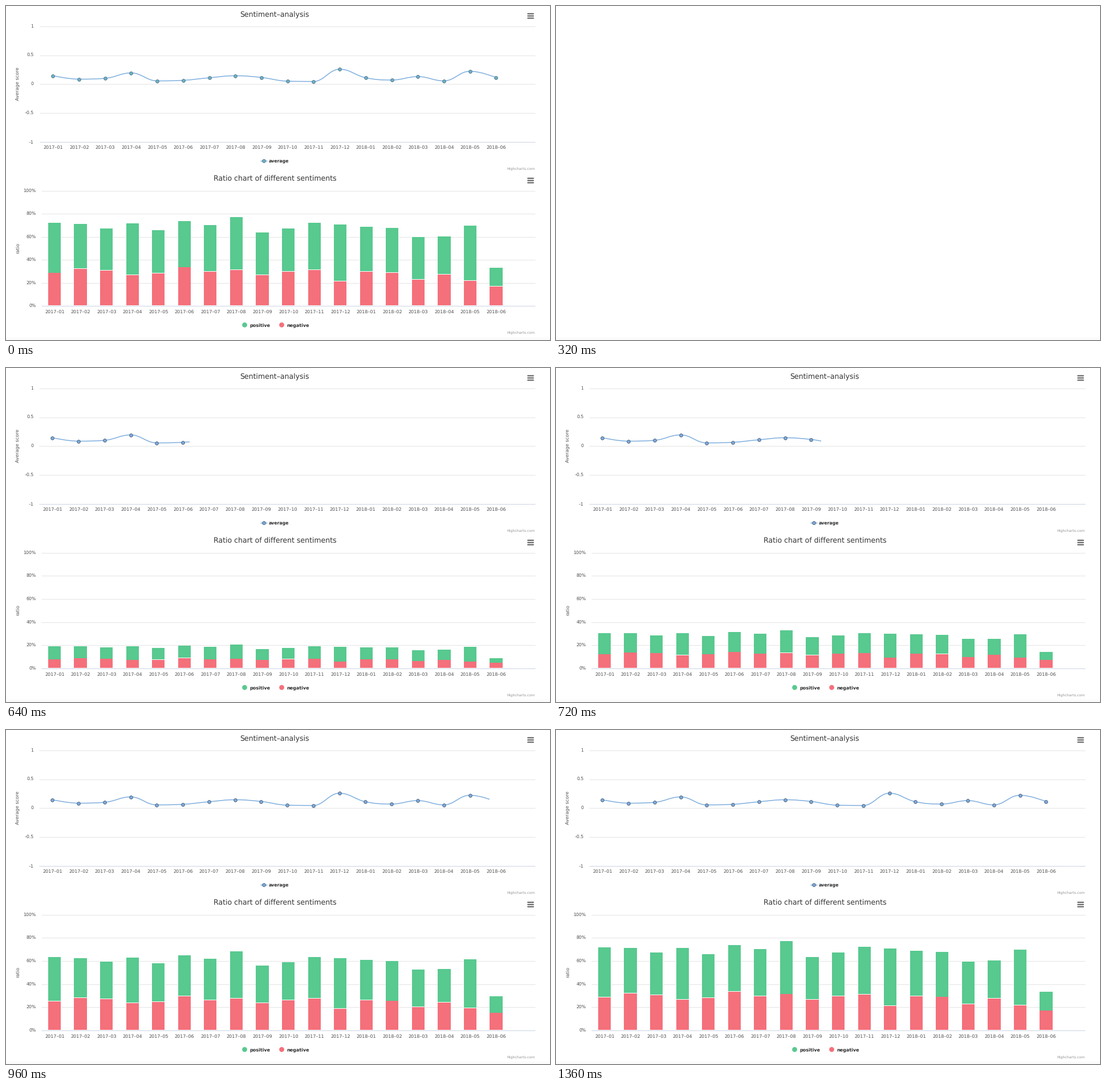
Recreate the animation shown at these times as a matplotlib script. Size 954 by 587 pixels, loop 1720 ms.

```python
import numpy as np
import matplotlib.pyplot as plt
from matplotlib.animation import FuncAnimation
from matplotlib.collections import PolyCollection
from matplotlib.patches import PathPatch, Rectangle
from matplotlib.path import Path

W, H, DPI = 954, 587, 128      # a power of two keeps the pixel size exact
STEP, FRAMES = 40, 43
HIDE, SHOW = 280, 400          # old charts go, new charts come (ms)
RIGHT, SLOTS = 928, 19

GRID, AXIS = "#e4e4e4", "#ccd3e2"
GREEN, RED, BLUE = "#58c98f", "#f4707b", "#7eaede"

MONTHS = [f"{2017 + k // 12}-{k % 12 + 1:02d}" for k in range(18)]
SCORE = np.array([.143, .084, .098, .192, .054, .064, .108, .143, .113,
                  .049, .044, .256, .108, .069, .128, .054, .221, .113])
TOTAL = np.array([71.8, 71.0, 67.3, 71.3, 65.6, 73.7, 70.3, 77.2, 63.5,
                  67.1, 72.0, 70.5, 68.8, 67.7, 59.6, 60.3, 69.5, 33.2])
NEGATIVE = np.array([28.4, 31.9, 30.5, 26.6, 28.0, 33.3, 29.4, 31.2, 26.6,
                     29.5, 31.0, 21.2, 29.4, 28.7, 22.7, 27.3, 21.6, 16.9])

plt.rcParams["font.family"] = "DejaVu Sans"
plt.rcParams["text.hinting"] = "none"
fig = plt.figure(figsize=(W / DPI, H / DPI), dpi=DPI, facecolor="white")
ax = fig.add_axes([0, 0, 1, 1])
ax.set_xlim(0, W)
ax.set_ylim(H, 0)
ax.axis("off")
ax.add_patch(Rectangle((0, 582), W, 5, fc="#fbfbfb", lw=0))


def px(size):
    return size * 72 / DPI


def spline(x, y):
    """Smooth path through the points without overshoot."""
    def handles(i):
        lx = (1.5 * x[i] + x[i - 1]) / 2.5
        rx = (1.5 * x[i] + x[i + 1]) / 2.5
        ly = (1.5 * y[i] + y[i - 1]) / 2.5
        ry = (1.5 * y[i] + y[i + 1]) / 2.5
        shift = (ry - ly) * (rx - x[i]) / (rx - lx) + y[i] - ry
        ly, ry = ly + shift, ry + shift
        lim = np.clip(ly, *sorted((y[i - 1], y[i])))
        if lim != ly:
            ly, ry = lim, 2 * y[i] - lim
        lim = np.clip(ry, *sorted((y[i + 1], y[i])))
        if lim != ry:
            ly, ry = 2 * y[i] - lim, lim
        return (lx, ly), (rx, ry)

    last = len(x) - 1
    verts, out = [(x[0], y[0])], (x[0], y[0])
    for i in range(1, last + 1):
        point = (x[i], y[i])
        into, nxt = handles(i) if i < last else (point, point)
        verts += [out, into, point]
        out = nxt
    return Path(verts, [Path.MOVETO] + [Path.CURVE4] * (len(verts) - 1))


def boxes(x, half, top, bottom):
    return [[(a - half, t), (a + half, t), (a + half, b), (a - half, b)]
            for a, t, b in zip(x, top, bottom)]


class Scene:
    """Both charts; the layout differs slightly before and after reloading."""

    def __init__(self, left, base, dot, edge):
        self.items = []
        self.left, self.base = left, base
        self.line_chart(dot, edge)
        self.bar_chart()

    def add(self, artist):
        self.items.append(artist)
        return artist

    def text(self, x, y, s, size, color="#505050", ha="center", **kw):
        kw.setdefault("va", "baseline")
        self.add(ax.text(x, y, s.replace("-", "\u2013"), fontsize=px(size),
                         color=color, ha=ha, **kw))

    def rule(self, x0, x1, y, color, width=1.0, z=1, cap="butt"):
        return self.add(ax.plot([x0, x1], [y, y], color=color, lw=px(width),
                                zorder=z, solid_capstyle=cap)[0])

    def dots(self, x, y, dot, edge):
        return self.add(ax.plot(x, y, "o", ms=px(5.7), mfc=dot, mec=edge,
                                mew=px(0.9), zorder=4, snap=False)[0])

    def frame(self, title, x, y, menu_y, credit_y):
        self.text(x, y, title, 12.5, "#333333")
        for dy in (-3.9, 0, 3.9):
            self.rule(915.1, 924.9, menu_y + dy, "#606060", 2.1,
                      cap="round").set_snap(False)
        self.text(RIGHT, credit_y, "Highcharts.com", 6.3, "#929292", "right")

    def y_axis(self, left, rows, labels, right, title, mid):
        for y, s in zip(rows, labels):
            zero = y == rows[-1]
            self.rule(left, RIGHT, np.floor(y) + .5, AXIS if zero else GRID,
                      z=3 if zero else 1)
            self.text(right, y + 3.2, s, 7.8, ha="right")
        self.text(21.3, mid, title, 8.25, rotation=90, va="center")

    def months(self, x, y):
        for a, s in zip(x, MONTHS):
            self.text(a, y, s, 8)

    def line_chart(self, dot, edge):
        self.frame("Sentiment-analysis", 471.3, 19, 17.5, 287.4)
        self.y_axis(self.left, np.linspace(35.3, 238.5, 5),
                    ["1", "0.5", "0", "-0.5", "-1"], 48.4,
                    "Average score", 136.5)
        slot = (RIGHT - self.left) / SLOTS
        x = self.left + slot * (np.arange(18) + .5)
        y = 137.1 - 101.7 * SCORE
        self.months(x + .3, 252)
        curve = self.add(ax.add_patch(PathPatch(
            spline(x, y), fc="none", ec=BLUE, lw=px(1.5), zorder=3)))
        self.clipped = [curve, self.dots(x, y, dot, edge)]
        self.rule(446.2, 457.8, 272, BLUE, 1.4)
        self.dots([452], [272], dot, edge)
        self.text(461, 274.8, "average", 7.8, "#2b2b2b", "left",
                  weight="bold")

    def bar_chart(self):
        low = self.base - 527
        self.frame("Ratio chart of different sentiments", 471.3, 308, 306.7,
                   576.8 + low)
        self.y_axis(62, np.linspace(324.2, self.base + .3, 6),
                    [f"{p}%" for p in range(100, -1, -20)], 52.4,
                    "ratio", 425.5)
        self.bar_x = 85 + 45.56 * np.arange(18)
        self.months(self.bar_x + .2, 541 + low)
        self.bars = [self.add(ax.add_collection(
            PolyCollection([], facecolors=c, linewidths=0, zorder=2)))
            for c in ("white", GREEN, RED)]
        for x, color, name in ((417.8, GREEN, "positive"),
                               (483, RED, "negative")):
            self.add(ax.plot([x], [560.7 + low], "o", ms=px(8.7), mfc=color,
                             mew=0, snap=False)[0])
            self.text(x + 9.4, 563.8 + low, name, 7.95, "#2b2b2b", "left",
                      weight="bold")

    def show(self, visible):
        for item in self.items:
            item.set_visible(visible)

    def pose(self, reveal, grow):
        window = Rectangle((self.left, 0),
                           max((RIGHT - self.left) * reveal, .01), 300,
                           transform=ax.transData)
        for item in self.clipped:
            item.set_clip_path(window)
        scale = (self.base - 324) / 100 * grow
        top = self.base - TOTAL * scale
        mid = self.base - NEGATIVE * scale
        floor = np.full(18, self.base)
        gap = .4 * grow
        white, green, red = self.bars
        white.set_verts(boxes(self.bar_x, 11.5, top - gap, floor))
        green.set_verts(boxes(self.bar_x, 11.1, top + gap, mid - gap))
        red.set_verts(boxes(self.bar_x, 11.1, mid + gap, floor))


def ease(t):
    return (1 - np.cos(np.pi * np.clip(t, 0, 1))) / 2


before = Scene(59.4, 526.4, "#70b1cb", "#4f7583")
after = Scene(58.3, 527.4, "#7eabdc", "#4a6079")


def draw(i):
    now = i * STEP
    before.show(now < HIDE)
    after.show(now >= SHOW)
    before.pose(1, 1)
    t = np.interp(now, [386, 480, 640, 1105, 1165], [0, .138, .371, 1, 1.08])
    after.pose(ease(t), ease(t - .028))
    return before.items + after.items


anim = FuncAnimation(fig, draw, frames=FRAMES, interval=STEP, repeat=True,
                     repeat_delay=0, init_func=lambda: draw(0), blit=False)
plt.show()
```
